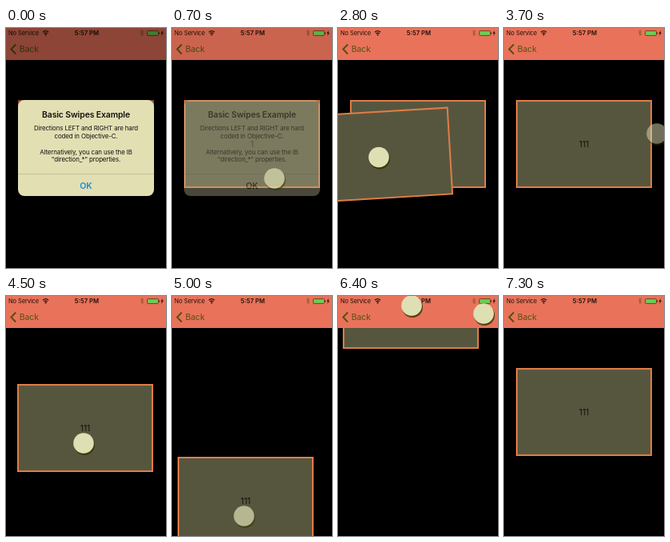
An HTML page for the animation above (7400 ms loop, 200 by 300 pixels).

```html
<!DOCTYPE html>
<html lang="en">
<head>
<meta charset="utf-8">
<title>Swipe cards</title>
<style>
  html, body { margin: 0; width: 100%; height: 100%; overflow: hidden; background: #000; }
  svg { display: block; width: 200px; height: 300px; font-family: Inter, Roboto, sans-serif; }
  .mid { text-anchor: middle; }
  .card rect { fill: #56563f; stroke: #e07d46; stroke-width: 2; }
  .card text { font-size: 10.4px; fill: #111108; }
  .body { font-size: 7.9px; letter-spacing: -.12px; }
  .status { font-size: 7.5px; }
</style>
</head>
<body>
<svg viewBox="0 0 200 300">
  <defs>
    <g id="dot">
      <circle cx="1" cy="2" r="13" fill="#333300" opacity=".8"/>
      <circle r="12.8" fill="#dfdfb4"/>
    </g>
  </defs>
  <rect width="200" height="300"/>
  <g id="third" class="card"><rect x="16" y="91" width="168" height="108"/><text class="mid" x="100" y="149">111</text></g>
  <g id="second" class="card"><rect x="16" y="91" width="168" height="108"/><text class="mid" x="100" y="149">11</text></g>
  <g id="first" class="card"><rect x="16" y="91" width="168" height="108"/><text class="mid" x="100" y="149">1</text></g>

  <g id="bar">
    <rect width="200" height="40" fill="#e8735a"/>
    <g class="status" fill="#201008">
      <text x="3" y="9.2" letter-spacing="-.1">No Service</text>
      <text class="mid" x="101" y="9.2" font-size="7.7" font-weight="600">5:57 PM</text>
      <g fill="none" stroke="#201008" stroke-width="1.2">
        <path d="M46 5.2q3.6-3.1 7.2 0M47.5 7q2.1-1.8 4.2 0"/>
      </g>
      <circle cx="49.6" cy="8.6" r="1"/>
    </g>
    <path d="M168.2 4.2l3.6 3.6-1.8 1.8V2.6l1.8 1.8-3.6 3.6" fill="none" stroke="#8c5528" stroke-width=".8"/>
    <rect x="176.5" y="3.5" width="14" height="6" rx="1" fill="none" stroke="#49310f" stroke-width=".7"/>
    <rect x="177.5" y="4.4" width="12" height="4.2" fill="#55d855"/>
    <path d="M191.5 5.4v2.2" stroke="#49310f"/>
    <path d="M195.8 2.8l-2.4 4h1.5l-.7 3.2 2.7-4.2h-1.6z" fill="#201008"/>
    <path d="M12.2 20.5L6.4 26.5l5.8 6" fill="none" stroke="#55500e" stroke-width="1.9"/>
    <text x="16.7" y="30.3" font-size="10.4" fill="#55500e">Back</text>
  </g>

  <rect id="dim" width="200" height="300"/>
  <g id="alert">
    <rect x="15" y="90" width="170" height="120" rx="8" fill="#e2dfb3"/>
    <path d="M15 182.5h170" stroke="#b5b48c" stroke-width=".7"/>
    <g class="mid" fill="#111">
      <text x="100" y="112" font-size="10.4" font-weight="600" letter-spacing="-.1">Basic Swipes Example</text>
      <g class="body">
        <text x="100" y="127.6">Directions LEFT and RIGHT are hard</text>
        <text x="100" y="137.5">coded in Objective-C.</text>
        <text x="100" y="157.5">Alternatively, you can use the IB</text>
        <text x="100" y="167.3">"direction_*" properties.</text>
      </g>
      <text id="ok" x="100" y="200.5" font-size="10.6" font-weight="600" fill="#168ce0">OK</text>
    </g>
  </g>
  <use id="echo" href="#dot"/>
  <use id="touch" href="#dot"/>
</svg>
<script>
const LOOP = 7400, STEP = 100;
const el = id => document.getElementById(id);

// Card keys: time, x, y, angle.
const cards = {
  first: [
    [1200, 0, 0, 0], [1400, -20, -14, 3.2], [1600, -6, -16, 3.4], [1800, 9, -11, 3.4],
    [2000, 30, 10, 3.4], [2200, 70, 50, 3.4], [2400, 240, 80, 3.4]
  ],
  second: [
    [2500, 0, 0, 0], [2700, -40, -28, -3.4], [2900, -48, 55, -3.4], [3100, -10, 60, -3.4],
    [3300, 12, 6, -3.4], [3500, 110, -6, -3.4], [3600, 240, -12, -3.4]
  ],
  third: [
    [4300, 0, 0, 0], [4500, -1, 20, 0], [4800, -7, 88, 0], [5000, -8, 111, 0],
    [5200, -6, 80, 0], [5500, 1, 8, 0], [5700, 0, -1, 0], [5900, 0, 0, 0],
    [6100, -3, -45, 0], [6400, -9, -134, 0], [6600, -9, -134, 0],
    [6800, -3, -60, 0], [7000, 0, -8, 0], [7200, 0, 0, 0]
  ]
};

// Touch keys: time, x, y, opacity.
const touch = [
  [300, 128, 188, 0], [400, 128, 188, 1], [600, 128, 188, 1], [700, 128, 188, .7], [900, 128, 188, 0],
  [1100, 93, 144, 0], [1200, 93, 144, 1], [1400, 73, 130, 1], [1600, 87, 128, 1], [1800, 102, 133, 1],
  [2000, 123, 154, 1], [2200, 163, 194, 1], [2400, 190, 220, 0],
  [2500, 95, 148, 1], [2700, 55, 120, 1], [2900, 47, 203, 1], [3100, 85, 208, 1],
  [3300, 107, 154, 1], [3500, 191, 132, 1], [3600, 191, 132, .8], [3700, 191, 132, .5], [4100, 191, 132, 0],
  [4200, 98, 164, 0], [4300, 98, 164, 1], [4500, 97, 184, 1], [4800, 91, 252, 1], [5000, 90, 275, .7],
  [5200, 90, 275, 0], [5700, 101, 146, 0], [5900, 101, 146, 1], [6100, 98, 101, 1],
  [6400, 92, 12, 1], [6600, 92, 12, 1], [6800, 92, 12, 0]
];
const echo = [
  [1600, 205, 267, 0], [1700, 205, 267, 1], [1800, 205, 267, 1], [2000, 205, 267, 0],
  [6200, 182, 22, 0], [6300, 182, 22, 1], [6400, 182, 22, 1], [6600, 182, 22, 0]
];
const fade = [[600, 1], [700, .32], [800, .1], [900, 0]];

function at(keys, t) {
  const next = keys.findIndex(k => k[0] > t);
  if (next === 0) return keys[0].slice(1);
  if (next < 0) return keys.at(-1).slice(1);
  const a = keys[next - 1], b = keys[next], p = (t - a[0]) / (b[0] - a[0]);
  return a.slice(1).map((v, i) => v + (b[i + 1] - v) * p);
}

function placeDot(id, keys, t) {
  const [x, y, opacity] = at(keys, t);
  el(id).setAttribute('transform', `translate(${x} ${y})`);
  el(id).setAttribute('opacity', opacity);
}

function draw(t) {
  for (const id in cards) {
    const [x, y, angle] = at(cards[id], t);
    el(id).setAttribute('transform', `translate(${x} ${y}) rotate(${angle} 100 145)`);
  }
  placeDot('touch', touch, t);
  placeDot('echo', echo, t);
  const [shown] = at(fade, t);
  el('alert').setAttribute('opacity', shown);
  el('dim').setAttribute('opacity', shown * .4);
  el('ok').setAttribute('fill', t < 700 ? '#168ce0' : '#111');
}

const start = performance.now();
function tick() {
  const elapsed = (performance.now() - start) % LOOP;
  draw(Math.floor(elapsed / STEP) * STEP);
  requestAnimationFrame(tick);
}
tick();
</script>
</body>
</html>
```
